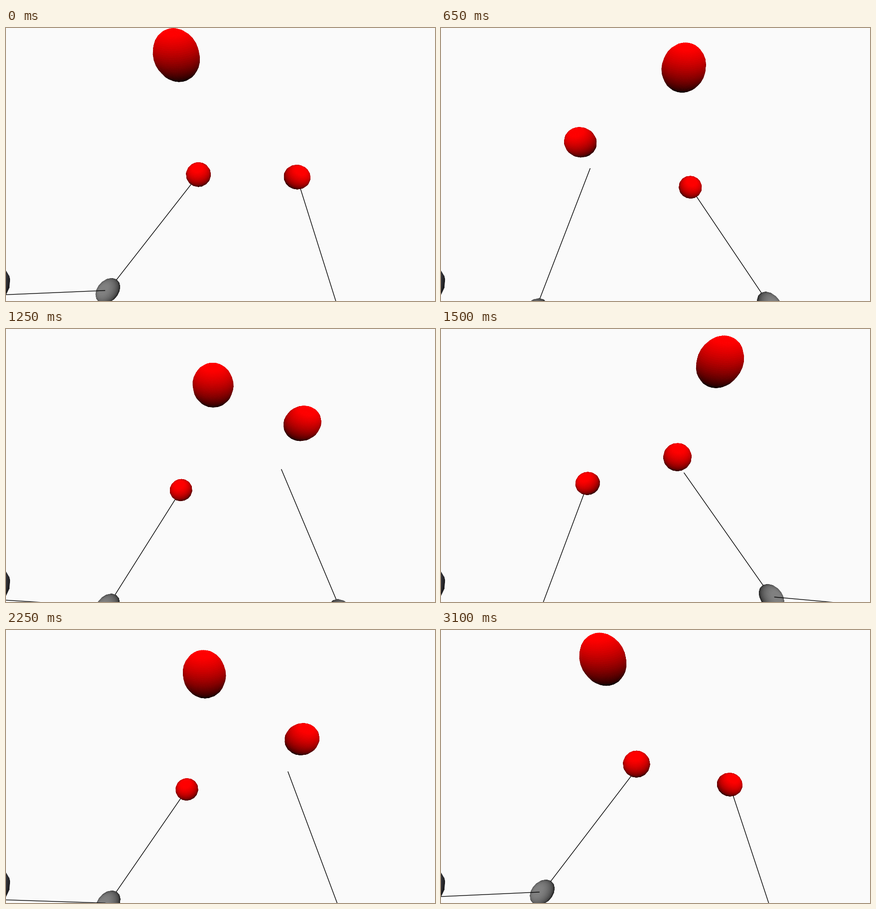
Animation of 861x549 px, one loop 3150 ms. Source, as a matplotlib script:

```python
import numpy as np
import matplotlib.pyplot as plt
from matplotlib.animation import FuncAnimation
from matplotlib.collections import LineCollection, PolyCollection

W, H, DPI = 861, 549, 64
FRAMES, STEP = 63, 50
BEAT = 525.0                      # ms between throws; flight takes two beats
LAG = 2.5

# Camera at the juggler's eyes; lengths are in ball radii
FOCAL = H / 2 / np.tan(np.radians(37.5))
PITCH, YAW = np.radians(51), 0.0195
CP, SP, CY, SY = np.cos(PITCH), np.sin(PITCH), np.cos(YAW), np.sin(YAW)

INNER, OUTER, LEVEL, DEPTH = 2.01, 6.15, -12.1, 8.62
APEX = 8.98
RED = np.array([1.0, 0, 0])
GREY = np.array([0.5, 0.5, 0.5])
SLATE = np.array([0.51, 0.51, 0.56])


def project(p):
    """World (right, up, forward) to stage pixels."""
    p = np.asarray(p, float)
    x, h, d = p[..., 0], p[..., 1], p[..., 2]
    side, ahead = x * CY + d * SY, d * CY - x * SY
    up, z = h * CP + ahead * SP, ahead * CP - h * SP
    return np.stack([W / 2 + FOCAL * side / z, H / 2 - FOCAL * up / z], -1)


def sphere_mesh(lon=16, lat=14, sub=3):
    """Unit sphere quads; each ring is cut in bands for smoother shading."""
    a = np.linspace(0, 2 * np.pi, lon + 1)
    b = np.linspace(0, np.pi, lat + 1)
    v = np.stack([np.outer(np.sin(b), np.cos(a)),
                  np.outer(np.cos(b), np.ones_like(a)),
                  np.outer(np.sin(b), np.sin(a))], -1)
    k = np.arange(lat * sub + 1) / sub
    i = np.minimum(k.astype(int), lat - 1)
    f = (k - i)[:, None, None]
    v = v[i] * (1 - f) + v[i + 1] * f
    q = np.stack([v[:-1, :-1], v[:-1, 1:], v[1:, 1:], v[1:, :-1]], 2)
    return q.reshape(-1, 4, 3)


MESH = sphere_mesh()
MID = MESH.mean(1)
UP = MID[:, 1] / np.linalg.norm(MID, axis=1)
NORMAL = np.cross(MESH[:, 2] - MESH[:, 0], MESH[:, 3] - MESH[:, 1])
NORMAL *= np.sign((NORMAL * MID).sum(1))[:, None]
LIGHT = np.clip(0.525 * (1 + UP), 0, 1)     # sky light from above


def sphere(center, color, radius=1.0):
    seen = (NORMAL * (MID * radius + center)).sum(1) < 0
    return project(MESH[seen] * radius + center), LIGHT[seen, None] * color


def hand(side, phase):
    """Phase 0 is the catch, BEAT is the throw."""
    u = (phase % BEAT) / BEAT
    ease, bow = u * u * (3 - 2 * u), u - u * u
    if phase < BEAT:
        x = INNER + (OUTER - INNER) * ease + 2.2 * bow
        y = LEVEL - 9.7 * bow
    else:
        x = OUTER - (OUTER - INNER) * ease - 1.1 * bow
        y = LEVEL + 4.75 * bow
    return np.array([side * x, y, DEPTH])


def flight(side, age):
    u = age / (2 * BEAT)
    x = OUTER - (OUTER + INNER) * u
    return np.array([side * x, LEVEL + APEX * 4 * u * (1 - u), DEPTH])


def elbow(side, grip):
    dx, dy = abs(grip[0]) - INNER, grip[1] - LEVEL
    return np.array([side * (11.05 + 0.02 * dx + 0.05 * dy),
                     -21.4 - 0.065 * dx + 0.26 * dy,
                     1.17 - 0.509 * dx + 0.097 * dy])


fig = plt.figure(figsize=(W / DPI, H / DPI), dpi=DPI, facecolor="#fafafa")
ax = fig.add_axes([0, 0, 1, 1])
ax.set_xlim(0, W)
ax.set_ylim(H, 0)
ax.axis("off")

PX = 72 / DPI
forearms = LineCollection([], colors="black", linewidths=1.35 * PX, zorder=1)
solids = PolyCollection([], linewidths=PX, joinstyle="round", zorder=2)
upper_arms = LineCollection([], colors="black", linewidths=1.35 * PX, zorder=3)
for artist in (forearms, solids, upper_arms):
    ax.add_collection(artist, autolim=False)


def draw(i):
    t = i * STEP - LAG
    parts, lower, upper = [], [], []
    for side, shift in ((-1, 0), (1, BEAT)):
        phase = (t + shift) % (2 * BEAT)
        grip = hand(side, phase)
        joint = elbow(side, grip)
        shoulder = np.array([side * 7.66, -6.6, 0.13])
        reach = shoulder - joint
        tip = joint + reach / np.linalg.norm(reach)
        lower.append(project([joint, grip]))
        upper.append(project([shoulder, tip]))
        parts.append(sphere(shoulder, SLATE, 0.9))
        parts.append(sphere(joint, GREY))
        if phase < BEAT:
            parts.append(sphere(grip, RED))
        age = (phase - BEAT) % (2 * BEAT)
        parts.append(sphere(flight(side, age), RED))
    colors = np.concatenate([c for _, c in parts])
    solids.set_verts(np.concatenate([v for v, _ in parts]))
    solids.set_facecolor(colors)
    solids.set_edgecolor(colors)
    forearms.set_segments(lower)
    upper_arms.set_segments(upper)
    return forearms, solids, upper_arms


anim = FuncAnimation(fig, draw, frames=FRAMES, interval=STEP,
                     init_func=lambda: draw(0), repeat=True, repeat_delay=0)
plt.show()
```
